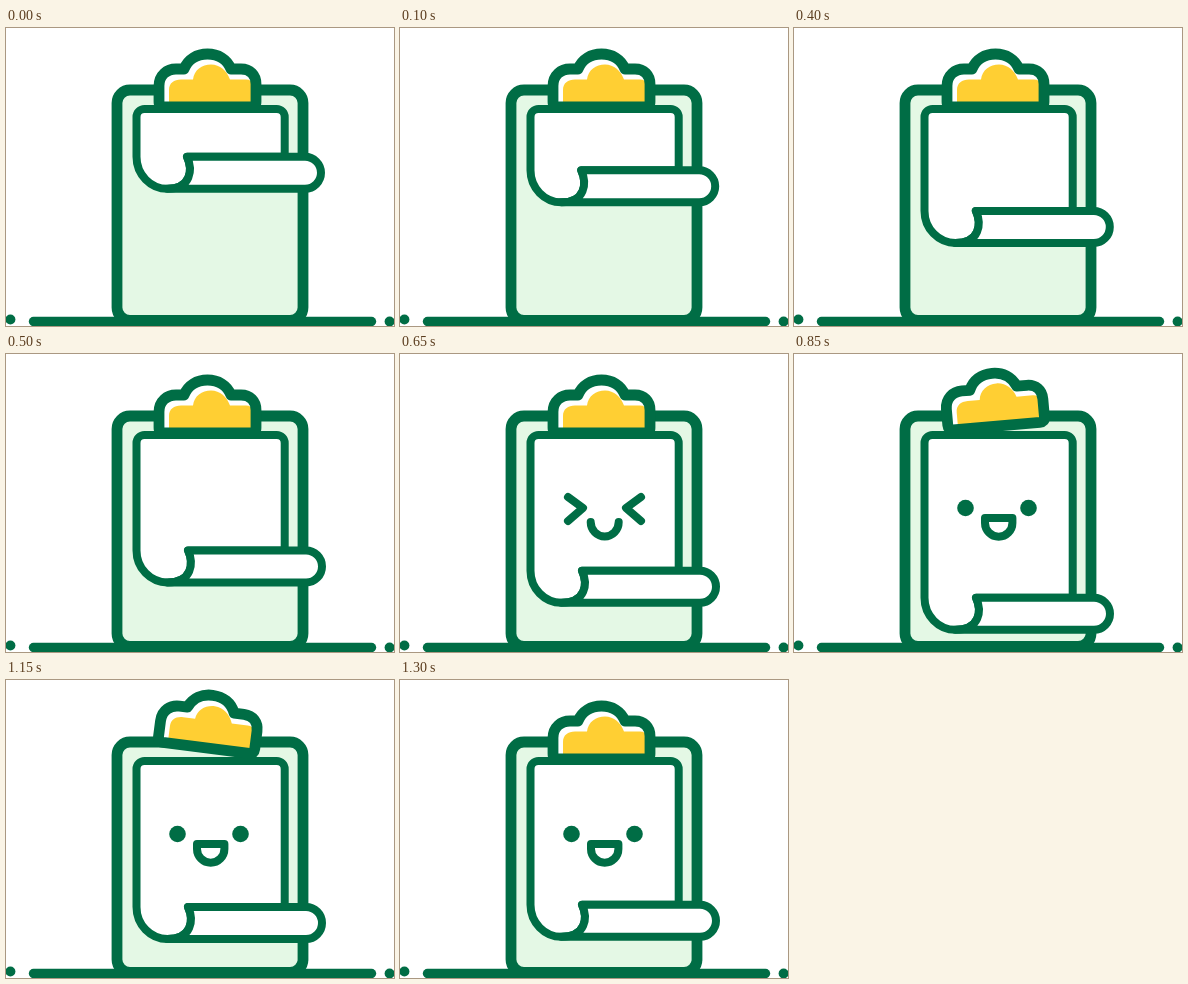
An HTML page that plays this animation: 388x298 px, repeating every 1.35 s.

```html
<!DOCTYPE html>
<html lang="en">
<head>
<meta charset="utf-8">
<title>Clipboard</title>
<style>
  html, body { margin: 0; width: 100%; height: 100%; overflow: hidden; background: #fff; }
  svg { display: block; width: 388px; height: 298px; }
  .line { stroke: #006d45; stroke-linecap: round; stroke-linejoin: round; }
  .thin { stroke-width: 8; }
  .thick { stroke-width: 10.8; }
  .ink { fill: #006d45; }
</style>
</head>
<body>
<svg viewBox="0 0 388 298" fill="none">
  <rect class="line thick" x="111" y="62" width="186" height="230.5" rx="13" fill="#e4f8e5"/>
  <path class="line" d="M27.5 293.5H365.5" stroke-width="9.4"/>
  <circle class="ink" cx="4.4" cy="291.5" r="5"/>
  <circle class="ink" cx="383.6" cy="293.5" r="5"/>

  <path id="paper" class="line thin" fill="#fff"/>
  <g id="wince" class="line" stroke-width="8">
    <path d="M168 143L183 154L168 167M241 143L226 154L241 167"/>
    <path d="M190.7 168a14 14.5 0 0 0 28 0"/>
  </g>
  <g id="happy">
    <circle class="ink" cx="171.5" cy="154" r="8.3"/>
    <circle class="ink" cx="234.5" cy="154" r="8.3"/>
    <path class="line" stroke-width="8" d="M191 164H218.4V169a13.7 13.7 0 0 1 -27.4 0Z"/>
  </g>
  <path id="roll" class="line thin" fill="#fff"/>

  <g id="clip">
    <path id="cloud" fill="#fff" d="M158 79Q153 79 153 74V58C153 47 161 41 170 41H178C182 31 191 26 201.5 26C212 26 221 31 225 41H235C244 41 250 47 250 56V74Q250 79 245 79Z"/>
    <path fill="#ffcf33" d="M163 76V62C163 55 168 51.5 175 51.5H187C188 42 196 36.5 205 36.5C214 36.5 221 43 224 51.5H240C244 51.5 246 53 246 56V76Z"/>
    <use href="#cloud" class="line thick" style="fill-opacity:0"/>
  </g>
</svg>
<script>
const LOOP = 1350, STEP = 50;
const $ = id => document.getElementById(id);

// [time, value] pairs, linear in between
const rollKeys = [[0, 129], [850, 244], [900, 248], [950, 245.5], [1050, 234.5], [1100, 230], [1150, 227.2], [1250, 225], [1350, 225]];
const tiltKeys = [[0, 0], [800, 0], [850, -5], [925, -8], [1000, 0], [1075, 8], [1150, 7.3], [1220, 0], [1350, 0]];

function at(keys, t) {
  const i = keys.findIndex(k => k[0] > t);
  const [t0, a] = keys[i - 1], [t1, b] = keys[i];
  return a + (b - a) * (t - t0) / (t1 - t0);
}

function hop(t) {
  const p = (t - 810) / 410;
  return p > 0 && p < 1 ? 78 * p * (1 - p) : 0;
}

function draw(t) {
  const y = at(rollKeys, t) - 0.2, low = y + 32;
  const dx = Math.min(1, t / 500);
  const lip = 181 + dx;

  $('paper').setAttribute('d',
    `M278.7 ${y}V89a8 8 0 0 0 -8 -8H138.5a8 8 0 0 0 -8 8V${y}` +
    `A31 32 0 0 0 161.5 ${low}C${185 + dx} ${low} ${187 + dx} ${y + 13} ${lip} ${y}Z`);
  $('roll').setAttribute('d',
    `M${lip} ${y}C${187 + dx} ${y + 13} ${185 + dx} ${low} 161.5 ${low}` +
    `H${299 + dx}a16 16 0 0 0 0 -32Z`);

  $('wince').style.display = t >= 600 && t < 750 ? '' : 'none';
  $('happy').style.display = t >= 750 ? '' : 'none';
  $('clip').setAttribute('transform', `translate(0 ${-hop(t)}) rotate(${at(tiltKeys, t)} 201.5 67)`);
}

const start = performance.now();
function tick() {
  const t = (performance.now() - start) % LOOP;
  draw(Math.floor(t / STEP) * STEP);
  requestAnimationFrame(tick);
}
tick();
</script>
</body>
</html>
```
